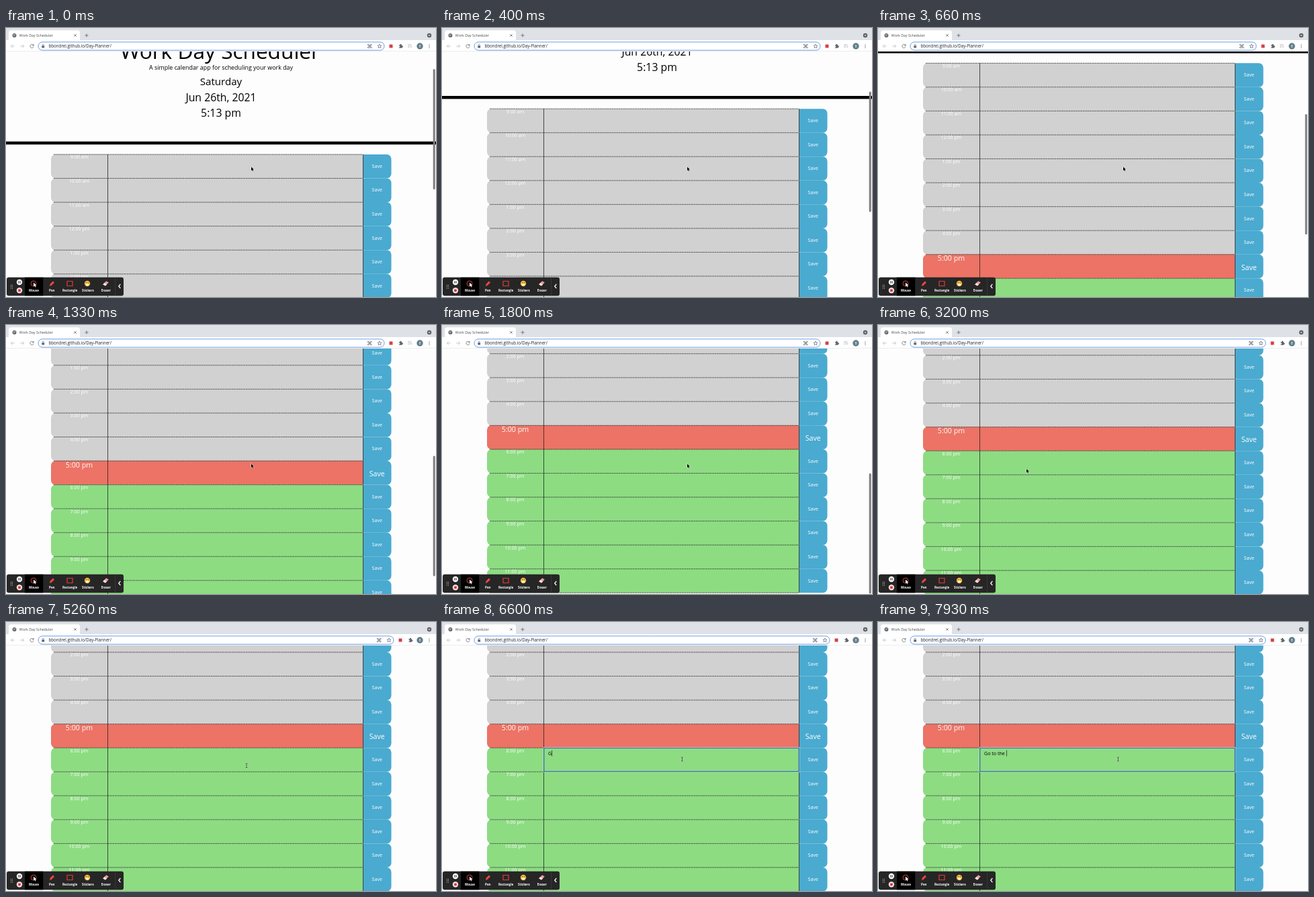
Write an HTML page with a canvas that moves like this. It is 640x400 px and loops after 8000 ms.

```html
<!DOCTYPE html>
<html lang="en">
<head>
<meta charset="utf-8">
<title>Work Day Scheduler</title>
<style>
html, body { margin: 0; width: 100%; height: 100%; overflow: hidden; background: #fdfdfd; }
canvas { display: block; width: 640px; height: 400px; }
</style>
</head>
<body>
<canvas id="stage"></canvas>
<script>
const LOOP = 8000, ROW = 320 / 9, TOP = 35;
const canvas = document.getElementById('stage');
const ratio = window.devicePixelRatio || 1;
canvas.width = 640 * ratio;
canvas.height = 400 * ratio;
const c = canvas.getContext('2d');
c.scale(ratio, ratio);

const ticks = [0, 60, 200, 330, 460, 600, 660, 860, 1000, 1200, 1330, 1530, 1660, 1800, 2000, 2130, 2260];
const scrollKeys = [[0, 188], [660, 52.3], [1330, -82.4], [1530, -118], [1800, -135.1], [2300, -135.1], [2530, -132.8]];
const mouseX = [[2300, 365], [3150, 221], [3900, 221], [4900, 358], [5300, 358], [5600, 357.4]];
const mouseY = [[2300, 206.5], [3150, 214], [3900, 214], [4900, 213.5], [5300, 213.5], [5600, 204]];
const note = 'Go to the ';

function tick(t) {
  if (t >= 2260) return 2260 + Math.floor((t - 2260) / 133) * 133;
  return ticks.filter(k => k <= t).pop();
}

function at(keys, t) {
  if (t <= keys[0][0]) return keys[0][1];
  for (let i = 1; i < keys.length; i++) {
    const [t0, a] = keys[i - 1], [t1, b] = keys[i];
    if (t <= t1) return a + (b - a) * (t - t0) / (t1 - t0);
  }
  return keys[keys.length - 1][1];
}

function text(s, x, y, size, color = '#000', align = 'center', weight = 400) {
  c.font = `${weight} ${size}px "Open Sans", "Noto Sans", sans-serif`;
  c.textAlign = align;
  c.fillStyle = color;
  c.fillText(s, x, y);
}

function box(x, y, w, h, color, radius = 0) {
  c.fillStyle = color;
  c.beginPath();
  c.roundRect(x, y, w, h, radius);
  c.fill();
}

function disc(x, y, r, color) {
  c.fillStyle = color;
  c.beginPath();
  c.arc(x, y, r, 0, 7);
  c.fill();
}

function path(d, x, y, stroke, fill, width = 1) {
  const p = new Path2D(d);
  c.save();
  c.translate(x, y);
  c.lineWidth = width;
  if (stroke) { c.strokeStyle = stroke; c.stroke(p); }
  if (fill) { c.fillStyle = fill; c.fill(p); }
  c.restore();
}

function hourRow(hour, y) {
  const now = hour === 17;
  const color = now ? '#ec7365' : hour < 17 ? '#d1d1d1' : '#8ddc82';
  const label = `${hour > 12 ? hour - 12 : hour}:00 ${hour < 12 ? 'am' : 'pm'}`;
  const size = now ? 10.67 : 7.11;
  box(67, y, 464.5, ROW, color, [6.7, 0, 0, 6.7]);
  box(531.5, y, 42, ROW, '#4aaad0', [0, 6.7, 6.7, 0]);
  c.setLineDash([1.6, 1]);
  path('M71 0H531', 0, y, '#222', null, 0.9);
  c.setLineDash([]);
  path(`M151.5 0V${ROW}M531.5 0V${ROW}`, 0, y, '#222', null, 0.8);
  text(label, 109, y + (now ? 9.6 : 6.4), size, '#fff');
  text('Save', 552.3, y + (now ? 22.8 : 19.9), size, '#fff');
}

function page(t, y0) {
  const d = y0 - 188;
  text('Work Day Scheduler', 318.5, 46 + d, 31.6);
  text('A simple calendar app for scheduling your work day', 320, 62.3 + d, 8.89);
  text('Saturday', 320, 85 + d, 15.1);
  text('Jun 26th, 2021', 320, 108.5 + d, 15.8);
  text('5:13 pm', 320, 131.5 + d, 15.8);
  box(0, 168.8 + d, 640, 4.5, '#000');
  for (let hour = 9; hour < 24; hour++) hourRow(hour, y0 + (hour - 9) * ROW);
  c.setLineDash([1.6, 1]);
  path('M71 0H531', 0, y0 + 15 * ROW, '#222', null, 0.9);
  c.setLineDash([]);
  if (t >= 5800) typedNote(t, y0 + 9 * ROW);
  if (t < 2260) box(635.7, 61 - d * 67 / 135.7, 3, 179, '#7d7d7d', 1.5);
}

function typedNote(t, y) {
  const count = Math.max(0, Math.min(note.length, Math.floor((t - 6600) / 147) + 1));
  const typed = note.slice(0, count);
  c.strokeStyle = '#eaf2fb';
  c.lineWidth = 0.6;
  c.strokeRect(151, y - 0.6, 381, ROW + 1);
  c.strokeStyle = '#2b66c4';
  c.lineWidth = 1;
  c.strokeRect(151.8, y + 0.3, 379.4, ROW - 0.8);
  text(typed, 158, y + 10.9, 7.11, '#000', 'left');
  if (count || (t - 5800) % 1000 < 500) box(158.3 + c.measureText(typed).width, y + 3.6, 0.6, 9, '#000');
}

function browser(late) {
  const grey = '#5f6368', pale = '#b9bbbe';
  box(0, 0, 640, 18.5, '#dee1e6');
  box(4, 3.5, 106, 16, '#fff', [3.5, 3.5, 0, 0]);
  box(0, 18, 640, 17, '#fff');
  box(0, 34.6, 640, 0.4, '#dcdcdc');
  disc(12.5, 11, 3, grey);
  path('M-2 -1L0 -.4L-.6 1.4M.6 -2L2 -.6', 12.5, 11, '#fff', null, 0.7);
  text('Work Day Scheduler', 19.8, 13, 5.33, '#45494d', 'left');
  path('M-1.7 -1.7L1.7 1.7M1.7 -1.7L-1.7 1.7', 103, 11, grey, null, 0.8);
  path('M-2.6 0H2.6M0 -2.6V2.6', 120, 11, grey, null, 0.8);
  disc(630, 11, 3.2, grey);
  path('M-1.5 -.6H1.5L0 1.2Z', 630, 11, null, '#fff');

  path('M2.8 0H-2.6M0 -2.6L-2.6 0L0 2.6', 10, 27, pale, null, 0.8);
  path('M-2.8 0H2.6M0 -2.6L2.6 0L0 2.6', 24, 27, pale, null, 0.8);
  path('M2.2 -1.4A2.6 2.6 0 1 0 2.6 .6M2.6 -3V-1H.6', 38.5, 27, grey, null, 0.8);

  const end = late ? 577 : 563;
  box(48, 20.9, end - 48, 12.2, '#fff', 6.1);
  c.strokeStyle = '#6c9ce8';
  c.lineWidth = 1;
  c.stroke();
  box(53.3, 26.2, 3.8, 3.2, grey, 0.5);
  path('M-1.1 0V-1A1.1 1.1 0 0 1 1.1 -1V0', 55.2, 26.2, grey, null, 0.6);
  text('bbondrel.github.io/Day-Planner/', 63.5, 29.1, 6.2, '#202124', 'left');

  path('M-2.7 -1V-2.7H-1M1 -2.7H2.7V-1M2.7 1V2.7H1M-1 2.7H-2.7V1M-1.3 -1.3H1.3V1.3H-1.3ZM-1.3 0H1.3',
    end - 21.7, 27, grey, null, 0.8);
  path('M0 -3L.9 -.9L3 -.8L1.4 .6L1.9 2.8L0 1.6L-1.9 2.8L-1.4 .6L-3 -.8L-.9 -.9Z', end - 7, 27, grey, null, 0.7);
  box(late ? 584.5 : 570.5, 24.5, 5, 5, '#d6404b', 0.6);
  path('M-2.6 -1.6H-.9A1 1 0 1 1 .9 -1.6H2V0A1 1 0 1 1 2 1.8V3H-2.6V1.7A1 1 0 1 0 -2.6 -.1Z',
    late ? 602 : 587.5, 26.8, null, grey);
  if (!late) path('M-3 -2H2.4M-3 0H2.4M-3 2H0M2 1V3.4M2 1H3.3', 601, 26.5, pale, null, 0.8);
  disc(616, 27, 4.7, '#607d8b');
  text('B', 616, 28.8, 4.8, '#fff');
  for (let i = -1; i < 2; i++) disc(630, 27 + i * 2.2, 0.65, grey);
}

function recorder() {
  box(1, 370.8, 174, 27.4, '#262626', 3);
  box(28, 370.8, 27.3, 27.4, '#000');
  box(162.5, 370.8, 0.6, 27.4, '#444');
  for (let i = 0; i < 6; i++) disc(7.2 + i % 2 * 2.2, 382.3 + (i >> 1) * 2.4, 0.6, '#ccc');
  disc(20, 378, 4.2, '#fff');
  path('M-1.1 -1.7V1.7M1.1 -1.7V1.7', 20, 378, '#222', null, 1);
  disc(20, 390.2, 4.2, '#f2dede');
  box(18.2, 388.4, 3.6, 3.6, '#d8332e', 0.4);

  c.strokeStyle = '#e0483e';
  c.lineWidth = 0.9;
  c.beginPath();
  c.arc(41, 380, 4, 0, 7);
  c.stroke();
  path('M0 0V6L1.5 4.7L2.6 6.8L3.6 6.2L2.6 4.3L4.5 4.2Z', 41, 378.6, '#000', '#fff', 0.6);
  path('M-3.6 3.9L-2.7 .8L1.6 -3.5L3.8 -1.3L-.5 3Z', 68.3, 380, null, '#e23c36');
  path('M-2.2 1.5L2.2 -2.8', 68.3, 380, '#f48a80', null, 0.6);
  path('M-4 -3.5H4V3.5H-4Z', 95, 380, '#df3c35', null, 1.2);
  disc(121, 380, 4.2, '#f6b93b');
  path('M-2.5 .3H2.5A2.5 2.5 0 0 1 -2.5 .3Z', 121, 380.3, null, '#fff');
  path('M-2.3 -1.3H-.8M.8 -1.3H2.3', 121, 380, '#7a3c18', null, 0.9);
  path('M-4.2 1.2L.8 -3.8L4.4 -1.4L-.5 3.6Z', 148.4, 380, null, '#ef9a9a');
  path('M-4.2 1.2L-1.9 -1.1L1.7 1.4L-.5 3.6Z', 148.4, 380, null, '#f7e4e4');
  ['Mouse', 'Pen', 'Rectangle', 'Stickers', 'Eraser'].forEach((name, i) =>
    text(name, 41.5 + i * 26.8, 391.7, 4.5, '#fff', 'center', 700));
  path('M1.3 -3L-1.3 0L1.3 3', 169, 384, '#fff', null, 1.2);
}

function pointer(t) {
  const x = at(mouseX, t), y = at(mouseY, t);
  if (t < 3950) {
    path('M0 0V5.7L1.3 4.5L2.2 6.5L3.2 6L2.3 4.1H4Z', x, y, '#fff', '#000', 0.9);
  } else {
    const beam = 'M-1.3 -3.2Q0 -3.2 0 -2.2V2.2Q0 3.2 -1.3 3.2M1.3 -3.2Q0 -3.2 0 -2.2M0 2.2Q0 3.2 1.3 3.2';
    path(beam, x, y, 'rgba(255,255,255,.6)', null, 1.6);
    path(beam, x, y, '#222', null, 0.8);
  }
}

function draw(now) {
  const t = now % LOOP, held = tick(t);
  box(0, 0, 640, 400, '#fdfdfd');
  c.save();
  c.beginPath();
  c.rect(0, TOP, 640, 400 - TOP);
  c.clip();
  page(t, at(scrollKeys, held));
  c.restore();
  browser(t >= 2000);
  recorder();
  pointer(held);
}

const start = performance.now();
function frame() {
  draw(performance.now() - start);
  requestAnimationFrame(frame);
}
frame();
</script>
</body>
</html>
```
